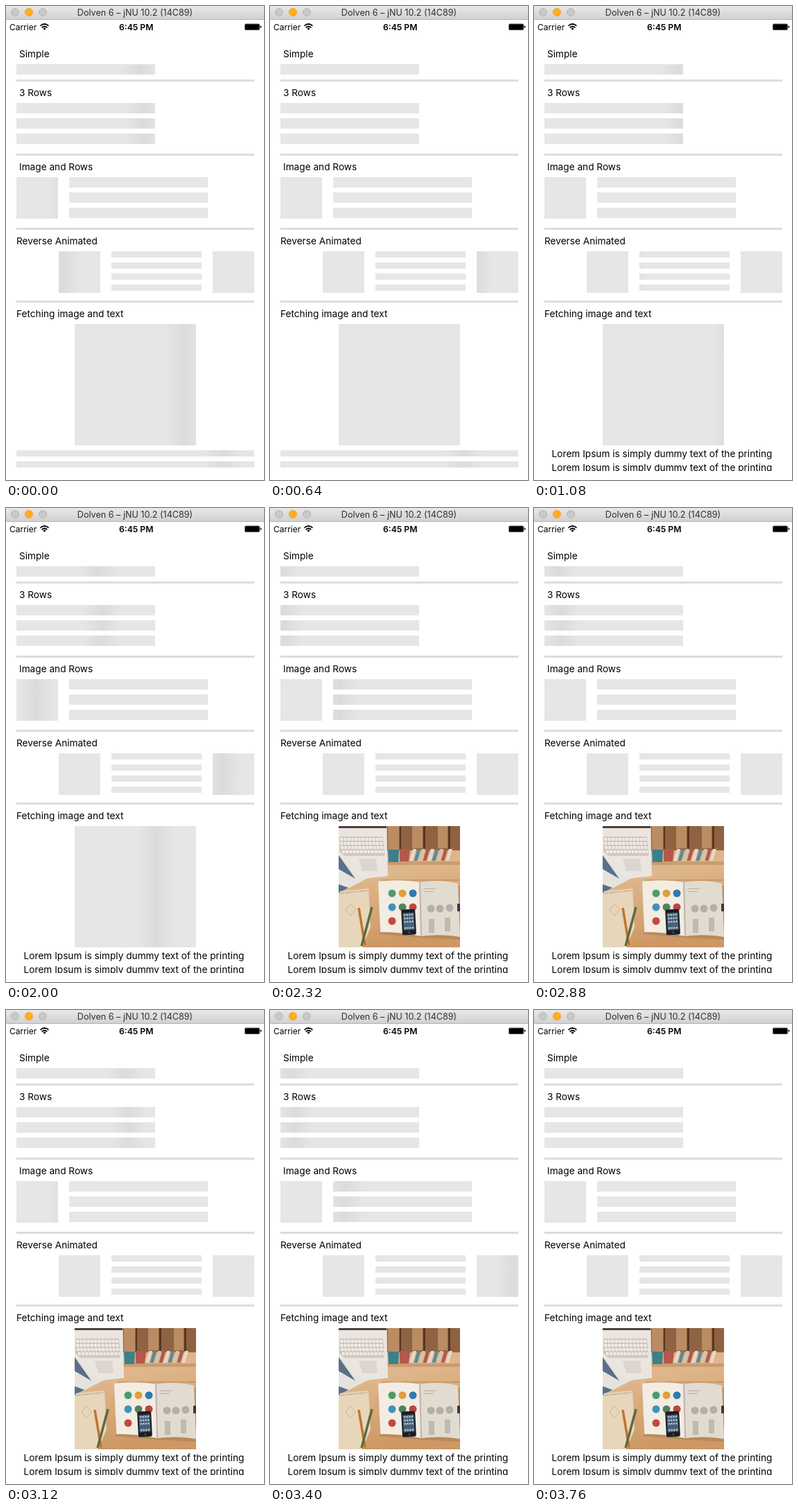
Write an HTML page that moves like this. It is 372 px wide and 684 px high and loops after 3.8 s.

```html
<!DOCTYPE html>
<html lang="en">
<head>
<meta charset="utf-8">
<title>Loading placeholders</title>
<style>
html, body { margin: 0; width: 100%; height: 100%; overflow: hidden; background: #fff; }
svg { display: block; }
text { font: 13.65px Inter, Roboto, sans-serif; fill: #000; white-space: pre; }
.title { font-size: 12.6px; fill: #303030; }
.status { font-size: 12px; }
.clock { font-size: 12.2px; font-weight: 600; }
.mid { text-anchor: middle; }
</style>
</head>
<body>
<svg id="stage" width="372" height="684" viewBox="0 0 372 684">
  <defs>
    <linearGradient id="chrome" x2="0" y2="1">
      <stop stop-color="#e8e8e8"/><stop offset="1" stop-color="#d0d0d0"/>
    </linearGradient>
    <linearGradient id="wood" x2=".2" y2="1">
      <stop stop-color="#cfa074"/><stop offset=".45" stop-color="#dfb78c"/><stop offset="1" stop-color="#cd9863"/>
    </linearGradient>
    <clipPath id="photoClip"><rect width="175" height="175"/></clipPath>
    <clipPath id="copyClip"><rect x="15" y="636" width="343" height="35"/></clipPath>
  </defs>

  <rect width="372" height="20" fill="url(#chrome)"/>
  <rect y="19" width="372" height="1" fill="#b4b4b4"/>
  <g fill="#c9c9c9" stroke="#b6b6b6">
    <circle cx="13" cy="9" r="5.5"/>
    <circle cx="33" cy="9" r="5.5" fill="#ffae1c" stroke="#eda31f"/>
    <circle cx="53" cy="9" r="5.5"/>
  </g>
  <text class="title mid" x="186" y="14">Dolven 6 – jNU 10.2 (14C89)</text>

  <text class="status" x="5" y="35">Carrier</text>
  <g fill="none" stroke="#000" stroke-width="1.8">
    <path d="M49.5 28.6Q55.5 23.4 61.5 28.6"/>
    <path d="M51.7 31.2Q55.5 27.9 59.3 31.2"/>
    <path d="M53.4 32.4Q55.5 30.8 57.6 32.4L55.5 34.8Z" fill="#000" stroke="none"/>
  </g>
  <text class="clock mid" x="187.7" y="35">6:45 PM</text>
  <rect x="344" y="25.5" width="22" height="9.5" rx="2" fill="#555"/>
  <rect x="345" y="26.5" width="20" height="7.5" rx="1"/>
  <path d="M366.6 28.3q1.8 .3 1.8 1.8t-1.8 1.8z"/>

  <text x="19" y="74">Simple</text>
  <text x="19" y="130">3 Rows</text>
  <text x="19" y="237">Image and Rows</text>
  <text x="15" y="344">Reverse Animated</text>
  <text x="15" y="449">Fetching image and text</text>
  <path d="M15 107.5H358M15 214.5H358M15 321.5H358M15 426.5H358" stroke="#dcdcdc" stroke-width="3"/>

  <g id="bars"></g>

  <g id="copy" clip-path="url(#copyClip)">
    <text class="mid" x="184.5" y="651">Lorem Ipsum is simply dummy text of the printing</text>
    <text class="mid" x="184.5" y="671">Lorem Ipsum is simply dummy text of the printing</text>
  </g>

  <g id="photo" transform="translate(99 459)">
    <g clip-path="url(#photoClip)">
      <rect width="175" height="175" fill="url(#wood)"/>
      <path d="M70 51H175V56H70zM62 77H175V79H62z" fill="#b98455" opacity=".5"/>
      <!-- books -->
      <rect x="70" width="105" height="35" fill="#8f6242"/>
      <path d="M71 0H87V34H71zM106 0H121V32H106zM143 0H157V32H143z" fill="#b98c63"/>
      <path d="M88 0H90V35H88zM122 0H125V33H122zM158 0H161V33H158z" fill="#5b3522"/>
      <path d="M71 34H87L86 52H72z" fill="#3b7f8c"/>
      <path d="M88 33H103L101 51H88z" fill="#b5574a"/>
      <g id="spines"></g>
      <!-- laptop and leaflet -->
      <path d="M0 42L44 74L0 97z" fill="#e6e3df"/>
      <path d="M0 42L24 76L0 62zM0 84L14 89L0 97z" fill="#5a7089"/>
      <path d="M0 0H69L71 72L36 76L0 42z" fill="#ebe5e0"/>
      <path d="M0 0H69V3H0z" fill="#4a4240"/>
      <path d="M1 15H64L66 43H8L1 36z" fill="#d0c7c0"/>
      <path d="M2 19H64M2 25H64M3 31H65M5 37H65" stroke="#f1ebe6" stroke-width="4" stroke-dasharray="4 1.2"/>
      <path d="M29 47H54L56 65H34z" fill="#dcd5cf"/>
      <!-- notebook and pencils -->
      <path d="M2 94L43 90L46 146L34 175H0V100z" fill="#e8d6ba"/>
      <path d="M3 97L42 93" stroke="#a89a88" stroke-width="2" stroke-dasharray="1.5 2"/>
      <path d="M10 121l7-9 8 9-8 8z" fill="none" stroke="#cbb797"/>
      <path d="M29 118L38 172" stroke="#bd7630" stroke-width="3.5"/>
      <path d="M48 117L33 173" stroke="#5e6a3f" stroke-width="3.5"/>
      <!-- magazine -->
      <path d="M59 84L117 83L175 86V164L118 161L59 156z" fill="#a87a50" opacity=".5"/>
      <path d="M57 80Q90 76 117 81L119 159Q88 152 60 153z" fill="#f2ece3"/>
      <path d="M117 81Q146 76 172 83L175 160Q146 155 119 159z" fill="#e2dbd0"/>
      <path d="M117 81L119 159" stroke="#bdb4aa" stroke-width="2"/>
      <g fill="#b5afa7">
        <circle cx="133" cy="119" r="5.5"/><circle cx="146" cy="119" r="5.5"/><circle cx="160" cy="118" r="5.5"/>
        <path d="M130 134H138V154H130zM153 132H161V152H153z" opacity=".75"/>
        <path d="M123 90H140V91H123zM123 94H137V95H123z"/>
      </g>
      <path d="M171 112h4v11h-4z" fill="#3b3937"/>
      <g id="dots"></g>
      <!-- phone -->
      <g transform="rotate(-3 101 138)">
        <rect x="91" y="120" width="20" height="37" rx="3" fill="#1d1d20"/>
        <rect x="93" y="125" width="16" height="25" fill="#45617b"/>
        <path d="M94.5 128H108M94.5 133H108M94.5 138H108M94.5 147H108" stroke="#b9c9cf" stroke-width="2.4" stroke-dasharray="2.4 1.2"/>
        <circle cx="101" cy="153.5" r="1.6" fill="#4a4a4d"/>
      </g>
    </g>
  </g>
</svg>
<script>
const LOOP = 3800, TICK = 40, SPEED = 0.572, HALF = 27;
const PAUSE = 1080, RESUME = 2000, COPY_AT = 840, PHOTO_AT = 2280;

const $ = id => document.getElementById(id);

function add(parent, tag, attrs) {
  const el = document.createElementNS("http://www.w3.org/2000/svg", tag);
  for (const k in attrs) el.setAttribute(k, attrs[k]);
  return parent.appendChild(el);
}

// A stack of bars crossed by one soft band, which starts at `phase` and wraps every `lap` pixels.
function shimmer({ x, y, width, height, rows = 1, phase, lap }) {
  const id = `band${x}-${y}`;
  const group = add($("bars"), "g", { fill: `url(#${id})` });
  const band = add(group, "linearGradient", { id, gradientUnits: "userSpaceOnUse" });
  ["#e6e6e6", "#dbdbdb", "#e6e6e6"].forEach((color, i) =>
    add(band, "stop", { offset: i / 2, "stop-color": color }));
  for (let i = 0; i < rows; i++) {
    add(group, "rect", { x, y: y + i * (height + 7), width, height });
  }
  const move = t => {
    const left = x - HALF * 2 + (phase + HALF + SPEED * t) % lap;
    band.setAttribute("x1", left);
    band.setAttribute("x2", left + HALF * 2);
  };
  return { group, move };
}

const bar = { width: 200, height: 15 };
const thumb = { width: 60, height: 60 };
const big = shimmer({ x: 99, y: 459, width: 175, height: 175, phase: 158, lap: 296 });
const lines = shimmer({ x: 15, y: 641, width: 343, height: 9, rows: 2, phase: 297, lap: 400 });
const shimmers = [
  big, lines,
  shimmer({ ...bar, x: 15, y: 84, phase: 178, lap: 301 }),
  shimmer({ ...bar, x: 15, y: 140, rows: 3, phase: 183, lap: 301 }),
  shimmer({ ...thumb, x: 15, y: 247, phase: 73, lap: 594 }),
  shimmer({ ...bar, x: 91, y: 247, rows: 3, phase: 512, lap: 610 }),
  shimmer({ ...thumb, x: 76, y: 354, phase: 5, lap: 730 }),
  shimmer({ x: 152, y: 354, width: 130, height: 9, rows: 4, phase: 186, lap: 820 }),
  shimmer({ ...thumb, x: 298, y: 354, phase: 390, lap: 760 })
];

const covers = ["#e4d8c8", "#5b8b98", "#d5c3aa", "#b25a4c"];
for (let i = 0; i < 9; i++) {
  add($("spines"), "path", { d: `M${107 + i * 6.5} 33h5l-5 17h-5z`, fill: covers[i % 4] });
}

["#4f9b6c", "#e0a03a", "#3178b0", "#3f91bb", "#53835a", "#b9463f", "#c4483c"].forEach((fill, i) =>
  add($("dots"), "circle", { cx: 77 + i % 3 * 15, cy: 97 + Math.floor(i / 3) * 20, r: 5.5, fill }));

function show(el, on) {
  el.style.display = on ? "" : "none";
}

const start = performance.now();
function draw() {
  const t = Math.floor((performance.now() - start) % LOOP / TICK) * TICK;
  const clock = t > PAUSE && t < RESUME ? PAUSE : t;
  shimmers.forEach(s => s.move(clock));
  show($("copy"), t >= COPY_AT);
  show(lines.group, t < COPY_AT);
  show($("photo"), t >= PHOTO_AT);
  show(big.group, t < PHOTO_AT);
  requestAnimationFrame(draw);
}
draw();
</script>
</body>
</html>
```
